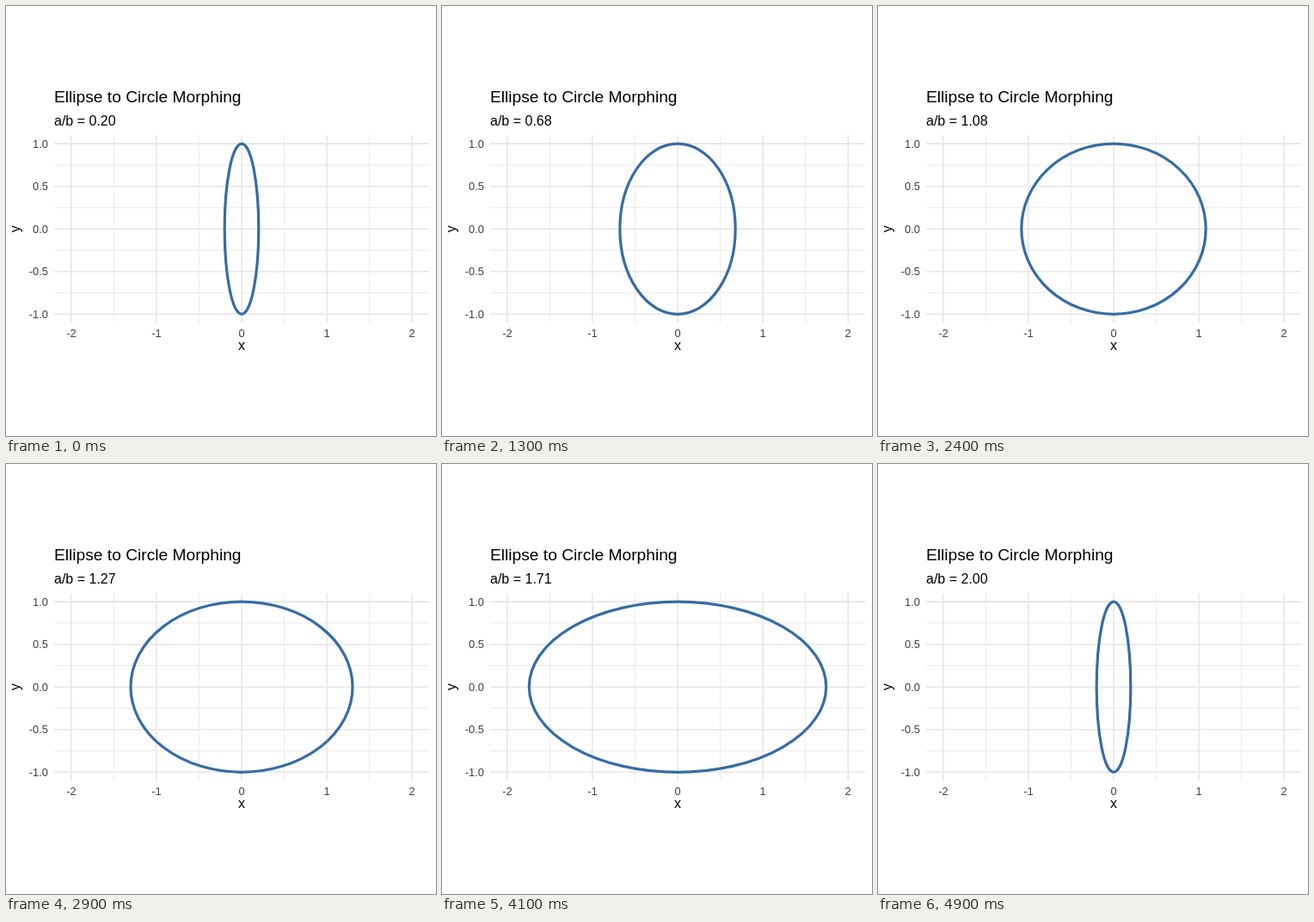
These frames come from a looping animation (500x500 px, 5 s). An HTML page with a canvas:

```html
<!DOCTYPE html>
<html lang="en">
<head>
<meta charset="utf-8">
<title>Ellipse to Circle Morphing</title>
<style>
  html, body { margin: 0; width: 100%; height: 100%; overflow: hidden; background: #fff; }
  canvas { display: block; width: 500px; height: 500px; }
</style>
</head>
<body>
<canvas id="plot" width="500" height="500"></canvas>
<script>
const ctx = document.getElementById('plot').getContext('2d');
const STEPS = 50, STEP_MS = 100;
const UNIT = 99.09, CX = 274, CY = 259.2;
const PANEL = { left: 56, right: 492, top: 150.2, bottom: 368.2 };

const px = x => CX + x * UNIT;
const py = y => CY - y * UNIT;
const ratio = k => 0.2 + 1.8 * k / (STEPS - 1);

function line(x1, y1, x2, y2) {
  ctx.beginPath();
  ctx.moveTo(x1, y1);
  ctx.lineTo(x2, y2);
  ctx.stroke();
}
const vLine = x => line(px(x), PANEL.top, px(x), PANEL.bottom);
const hLine = y => line(PANEL.left, py(y), PANEL.right, py(y));

function text(str, x, y, size, color = '#000', align = 'left') {
  ctx.font = `${size}px "Liberation Sans", Arial, sans-serif`;
  ctx.fillStyle = color;
  ctx.textAlign = align;
  ctx.fillText(str, x, y);
}

function drawGrid() {
  ctx.strokeStyle = '#e6e6e6';
  ctx.lineWidth = 0.78;
  for (let x = -1.5; x <= 1.5; x++) vLine(x);
  for (let y = -0.75; y <= 0.75; y += 0.5) hLine(y);
  ctx.lineWidth = 1.55;
  for (let x = -2; x <= 2; x++) vLine(x);
  for (let y = -1; y <= 1; y += 0.5) hLine(y);
}

function drawLabels(step) {
  const grey = '#3e3e3e';
  text('Ellipse to Circle Morphing', 56, 112, 19.2);
  text(`a/b = ${ratio(step).toFixed(2)}`, 56, 139, 16);
  for (let x = -2; x <= 2; x++) text(String(x), px(x), 385, 12.8, grey, 'center');
  for (let y = -1; y <= 1; y += 0.5) text(y.toFixed(1), 48.8, py(y) + 4.6, 12.8, grey, 'right');
  text('x', CX, 399.6, 16, '#000', 'center');
  ctx.save();
  ctx.translate(15.6, CY);
  ctx.rotate(-Math.PI / 2);
  text('y', 0, 0, 16, '#000', 'center');
  ctx.restore();
}

function drawEllipse(step) {
  // The shape runs through all states and returns to the first on the last step.
  const state = Math.round(step * STEPS / (STEPS - 1)) % STEPS;
  ctx.strokeStyle = '#376ca4';
  ctx.lineWidth = 3.2;
  ctx.beginPath();
  ctx.ellipse(CX, CY, ratio(state) * UNIT, UNIT, 0, 0, 2 * Math.PI);
  ctx.stroke();
}

function draw(ms) {
  const step = Math.floor(ms / STEP_MS) % STEPS;
  ctx.fillStyle = '#fff';
  ctx.fillRect(0, 0, 500, 500);
  drawGrid();
  drawEllipse(step);
  drawLabels(step);
}

const start = performance.now();
function tick() {
  draw(performance.now() - start);
  requestAnimationFrame(tick);
}
tick();
</script>
</body>
</html>
```
